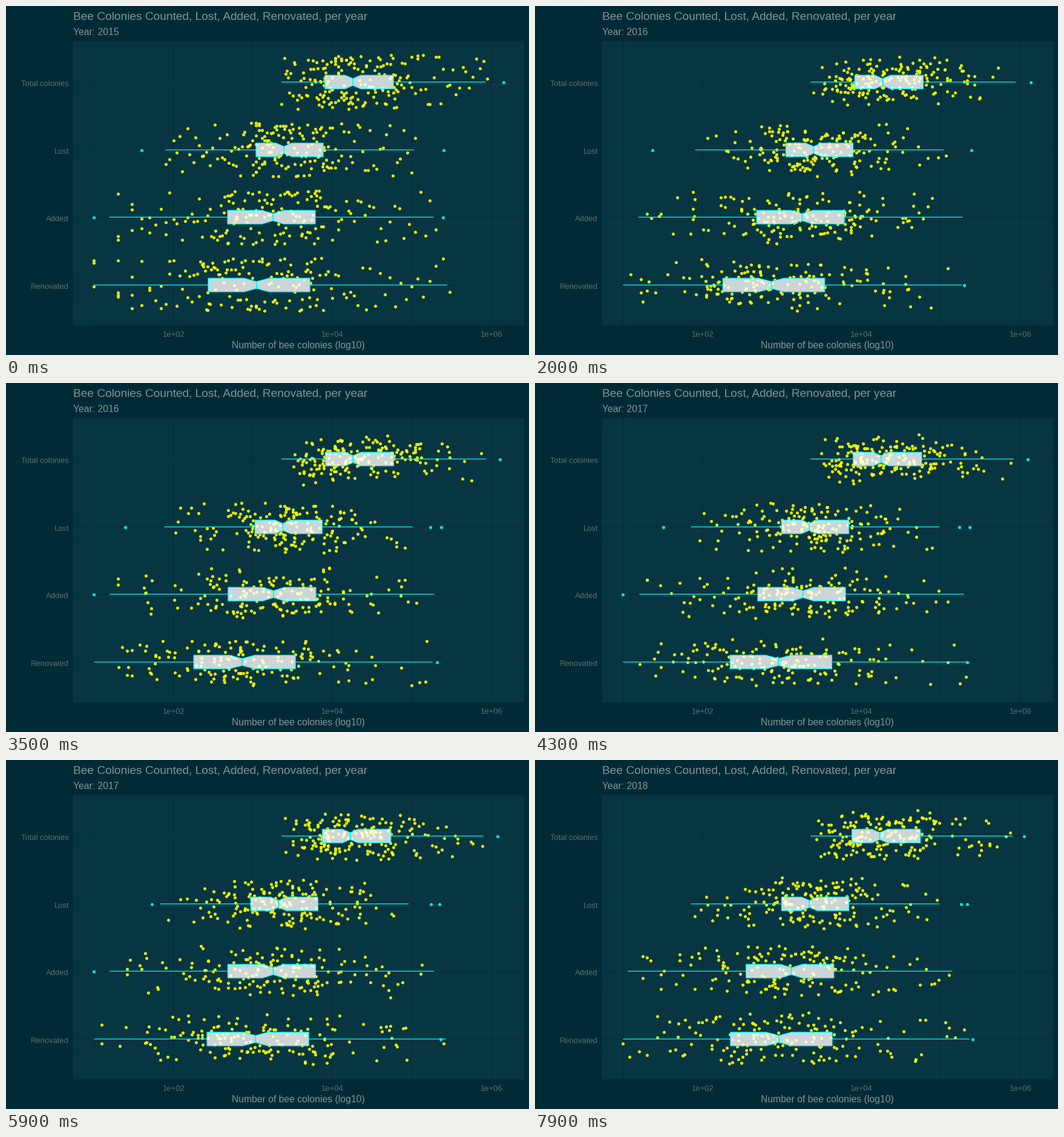
A matplotlib script that plays this animation: 864x576 px, repeating every 8 s.

```python
import matplotlib.pyplot as plt
import numpy as np
from matplotlib.animation import FuncAnimation
from matplotlib.patches import Polygon, Rectangle

W, H, DPI = 864, 576, 100
FRAMES, STEP = 80, 100
PX = 72 / DPI

BASE, PANEL, TEXT, MUTED = "#002b36", "#073642", "#839496", "#586e75"
CYAN, YELLOW = "#00ffff", "#ffff00"

START, SPAN = 0.4, 2.37     # first move and seconds per year
DECADE, X10 = 131.2, 145.3  # pixels per power of ten, position of 10
TOP, GAP = 125.5, 111.5     # first row and row distance
BOX, NOTCH, JITTER = 11.2, 5.6, 44.6
REACH = 1.35                # whisker length in box widths

# Name, points, box reach left and right of the median, least position,
# yearly medians
ROWS = [
    ("Total colonies", 188, 46, 67, 455, (573, 575, 570, 566, 588)),
    ("Lost", 178, 46, 65, X10, (459, 461, 449, 453, 455)),
    ("Added", 164, 75, 70, X10, (441, 441, 444, 436, 361)),
    ("Renovated", 160, 80, 88, X10, (414, 379, 415, 406, 387)),
]

# Outliers that drift: row, start and end time, start and end position
STRAYS = [
    (0, 0, 8, 822, 808),
    (1, 0, 2.7, 224, 184), (1, 2.8, 6, 184, 243),
    (1, 0, 8, 723, 714), (1, 2.8, 8, 700, 704),
    (2, 0, 1.3, 145, 220), (2, 0, 1.3, 722, 571), (2, 2.8, 7.1, 145, 145),
    (3, 0.5, 8, 705, 723),
]

rng = np.random.default_rng(15)


def row_y(r):
    return TOP + GAP * r


def box_stats(row, med):
    """Low whisker, quartile, median, quartile and high whisker."""
    _, _, left, right, least, _ = row
    reach = REACH * (left + right)
    q1, q3 = med - left, med + right
    return max(least, q1 - reach), q1, med, q3, q3 + reach


def spread(u, stats):
    """Turn ranks in 0..1 into positions that fit the five box figures."""
    lo, q1, med, q3, hi = stats
    x = np.interp(u, [0.25, 0.5, 0.75], [q1, med, q3])
    low, high = np.clip(1 - 4 * u, 0, 1), np.clip(4 * u - 3, 0, 1)
    return x - (q1 - lo) * low ** 1.7 + (hi - q3) * 1.04 * high ** 1.9


def to_counts(x):
    """Snap positions to colony counts of two digits."""
    v = np.maximum(10, 10 ** (1 + (x - X10) / DECADE))
    unit = np.maximum(10, 10 ** (np.floor(np.log10(v)) - 1))
    return X10 + (np.log10(np.round(v / unit) * unit) - 1) * DECADE


def make_points(r):
    n, medians = ROWS[r][1], ROWS[r][-1]
    shared = rng.normal(size=n)
    states = []
    for med in medians:
        z = shared + rng.normal(size=n)
        u = (z.argsort().argsort() + 0.5) / n
        x = to_counts(spread(u, box_stats(ROWS[r], med)))
        y = row_y(r) + rng.uniform(-JITTER, JITTER, n)
        states.append(np.column_stack([x, y]))
    return np.array(states)


points = np.concatenate([make_points(r) for r in range(len(ROWS))], axis=1)

plt.rcParams["font.family"] = "Liberation Sans"
fig = plt.figure(figsize=(W / DPI, H / DPI), dpi=DPI, facecolor=BASE)
ax = fig.add_axes([0, 0, 1, 1])
ax.set_xlim(0, W)
ax.set_ylim(H, 0)
ax.axis("off")


def label(x, y, s, size, color, ha="left"):
    return ax.text(x, y, s, fontsize=size * PX, color=color, ha=ha, va="baseline")


def line(xs, ys, color, width, z):
    return ax.plot(xs, ys, color=color, lw=width * PX, zorder=z,
                   solid_capstyle="butt", snap=False)[0]


def dots(color, z):
    return ax.scatter([], [], s=(5.2 * PX) ** 2, c=color, alpha=0.87,
                      linewidths=0, zorder=z)


def shape(**style):
    return ax.add_patch(Polygon([(0, 0)] * 3, snap=False, **style))


ax.add_patch(Rectangle((111, 58), 745, 469, fc=PANEL, lw=0, zorder=0))
for k in range(6):
    x = int(X10 + k * DECADE) + 0.5
    line([x, x], [58, 527], BASE, 1, 1)
    if k % 2:
        label(x, 546, f"1e+{k + 1:02d}", 13, MUTED, "center")

whiskers, fills, edges, medians = [], [], [], []
for r, row in enumerate(ROWS):
    y = int(row_y(r)) + 0.5
    line([111, 856], [y, y], BASE, 1, 1)
    label(104, y + 6.2, row[0], 13, MUTED, "right")
    whiskers.append([line([0, 0], [y, y], CYAN, 1.2, 3) for _ in range(2)])
    fills.append(shape(fc="white", alpha=0.8, lw=0, zorder=3))
    edges.append(shape(fill=False, ec=CYAN, lw=1.3 * PX, zorder=4))
    medians.append(line([0, 0], [y - NOTCH, y + NOTCH], CYAN, 2.2, 4))

label(111, 23, "Bee Colonies Counted, Lost, Added, Renovated, per year", 19.15, TEXT)
label(483, 565, "Number of bee colonies (log10)", 15.7, TEXT, "center")
year = label(111, 48, "", 15.7, TEXT)
cloud, strays = dots(YELLOW, 2), dots(CYAN, 5)


def notched(q1, med, q3, y, n):
    d = 1.58 * (q3 - q1) / np.sqrt(n)
    top = [(q1, -BOX), (med - d, -BOX), (med, -NOTCH), (med + d, -BOX), (q3, -BOX)]
    return [(x, y + h) for x, h in top] + [(x, y - h) for x, h in reversed(top)]


def draw(i):
    t = i * STEP / 1000
    p = max(0, (t - START) / SPAN)
    k, f = int(p), p % 1
    year.set_text(f"Year: {2015 + int(p + 0.5)}")
    cloud.set_offsets(points[k] * (1 - f) + points[k + 1] * f)

    for r, row in enumerate(ROWS):
        med = np.interp(p, range(5), row[-1])
        lo, q1, med, q3, hi = box_stats(row, med)
        whiskers[r][0].set_xdata([lo, q1])
        whiskers[r][1].set_xdata([q3, hi])
        outline = notched(q1, med, q3, int(row_y(r)) + 0.5, row[1])
        fills[r].set_xy(outline)
        edges[r].set_xy(outline)
        medians[r].set_xdata([med, med])

    strays.set_offsets([(np.interp(t, (t0, t1), (x0, x1)), int(row_y(r)) + 0.5)
                        for r, t0, t1, x0, x1 in STRAYS if t0 <= t <= t1])
    return []


anim = FuncAnimation(fig, draw, frames=FRAMES, interval=STEP,
                     init_func=lambda: draw(0), repeat=True, repeat_delay=0)
plt.show()
```
